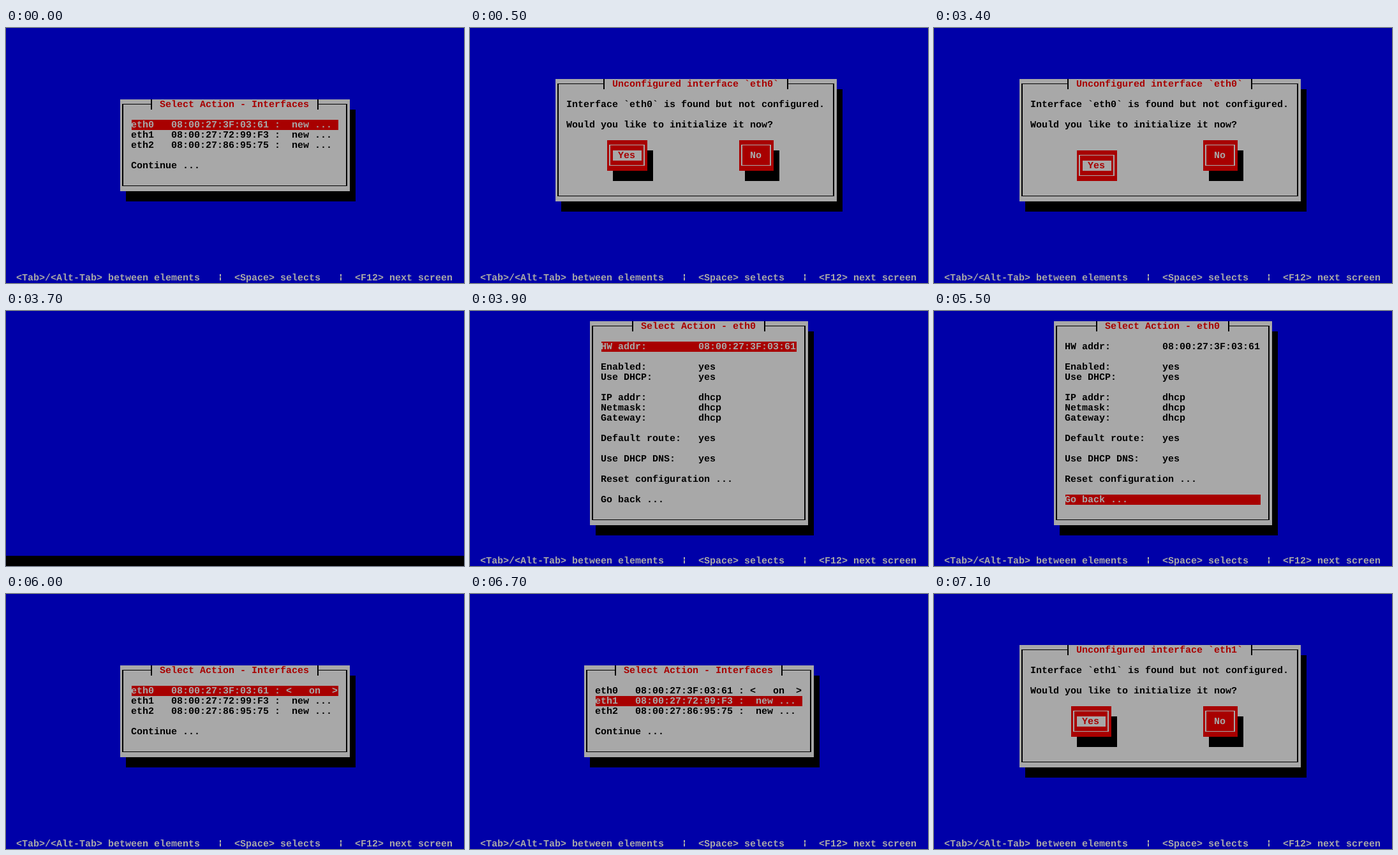
An HTML page for the animation above (8 s loop, 718 by 400 pixels).

```html
<!DOCTYPE html>
<html lang="en">
<head>
<meta charset="utf-8">
<title>Network setup</title>
<style>
html, body { margin: 0; width: 100%; height: 100%; overflow: hidden; background: #0000a8; }
svg { display: block; width: 100%; height: 100%; }
text {
  font: bold 15px "Liberation Mono", "DejaVu Sans Mono", monospace;
  white-space: pre;
  text-rendering: geometricPrecision;
  font-variant-ligatures: none;
}
rect { shape-rendering: crispEdges; }
</style>
</head>
<body>
<svg id="screen" viewBox="0 0 718 400"></svg>
<script>
const BLUE = '#0000a8', GRAY = '#a8a8a8', RED = '#a80000', BLACK = '#000';
const LOOP = 8000;
const screen = document.getElementById('screen');

// Text-mode grid: 80 columns of 9px, 25 rows of 16px.
const X = col => col * 9 - 1;
const Y = row => row * 16;

const rect = (x, y, w, h, fill) =>
  `<rect x="${x}" y="${y}" width="${w}" height="${h}" fill="${fill}"/>`;

const fillCells = (col, row, cols, rows, fill) =>
  rect(X(col), Y(row), cols * 9, rows * 16, fill);

const escapeText = s => s.replace(/&/g, '&amp;').replace(/</g, '&lt;').replace(/>/g, '&gt;');

const print = (col, row, s, fill = BLACK) =>
  `<text x="${X(col) - 1}" y="${Y(row) + 12}" fill="${fill}">${escapeText(s)}</text>`;

// Box-drawing border running through the middle of the outer cells.
function border(col, row, cols, rows, color) {
  const left = X(col) + 3, right = X(col + cols - 1) + 3;
  const top = Y(row) + 7, bottom = Y(row + rows - 1) + 7;
  const w = right - left + 2, h = bottom - top + 1;
  return rect(left, top, w, 1, color) + rect(left, bottom, w, 1, color) +
    rect(left, top, 2, h, color) + rect(right, top, 2, h, color);
}

function panel(col, row, cols, rows, title, titleCol) {
  const endCol = titleCol + title.length + 1;
  const gap = X(titleCol - 2) + 3;
  return fillCells(col + 1, row + 1, cols, rows, BLACK) +
    fillCells(col, row, cols, rows, GRAY) +
    border(col, row, cols, rows, BLACK) +
    rect(gap, Y(row), X(endCol) + 5 - gap, 16, GRAY) +
    rect(gap, Y(row), 2, 16, BLACK) +
    rect(X(endCol) + 3, Y(row), 2, 16, BLACK) +
    print(titleCol, row, title, RED);
}

function button(col, row, label, focused, pressed) {
  const cols = label.length + 4;
  const shadow = pressed ? '' : fillCells(col + 1, row + 1, cols, 3, BLACK);
  if (pressed) { col++; row++; }
  return shadow + fillCells(col, row, cols, 3, RED) +
    border(col, row, cols, 3, GRAY) +
    (focused ? fillCells(col + 1, row + 1, cols - 2, 1, GRAY) : '') +
    print(col + 2, row + 1, label, focused ? RED : GRAY);
}

function list(col, row, cols, items, selected) {
  return items.map((item, i) => {
    const on = i === selected;
    return (on ? fillCells(col, row + i, cols, 1, RED) : '') +
      (item ? print(col, row + i, item, on ? GRAY : BLACK) : '');
  }).join('');
}

function footer() {
  const bar = col => rect(X(col) + 3, Y(24) + 2, 2, 4, GRAY) + rect(X(col) + 3, Y(24) + 7, 2, 5, GRAY);
  return print(2, 24, '<Tab>/<Alt-Tab> between elements', GRAY) + bar(37) +
    print(40, 24, '<Space> selects', GRAY) + bar(58) +
    print(61, 24, '<F12> next screen', GRAY);
}

function interfaces(state, selected) {
  const items = [
    'eth0   08:00:27:3F:03:61 : ' + state,
    'eth1   08:00:27:72:99:F3 :  new ...',
    'eth2   08:00:27:86:95:75 :  new ...',
    '',
    'Continue ...'
  ];
  return panel(20, 7, 40, 9, 'Select Action - Interfaces', 27) +
    list(22, 9, 36, items, selected) + footer();
}

function question(name, pressed) {
  return panel(15, 5, 49, 12, `Unconfigured interface \`${name}\``, 25) +
    print(17, 7, `Interface \`${name}\` is found but not configured.`) +
    print(17, 9, 'Would you like to initialize it now?') +
    button(24, 11, 'Yes', true, pressed) +
    button(47, 11, 'No', false, false) + footer();
}

function settings(selected) {
  const pair = (label, value) => label.padEnd(17) + value;
  const items = [
    pair('HW addr:', '08:00:27:3F:03:61'), '',
    pair('Enabled:', 'yes'), pair('Use DHCP:', 'yes'), '',
    pair('IP addr:', 'dhcp'), pair('Netmask:', 'dhcp'), pair('Gateway:', 'dhcp'), '',
    pair('Default route:', 'yes'), '',
    pair('Use DHCP DNS:', 'yes'), '',
    'Reset configuration ...', '',
    'Go back ...'
  ];
  return panel(21, 1, 38, 20, 'Select Action - eth0', 30) +
    list(23, 3, 34, items, selected) + footer();
}

// Between dialogs the terminal is reset, which clears its last line.
const resetScreen = () => rect(0, Y(24), 718, 16, BLACK);

const scenes = [
  [0, () => interfaces(' new ...', 0)],
  [500, () => question('eth0', false)],
  [3400, () => question('eth0', true)],
  [3500, () => question('eth0', false)],
  [3700, resetScreen],
  [3900, () => settings(0)],
  [5000, () => settings(1)],
  [5500, () => settings(15)],
  [6000, () => interfaces('<   on  >', 0)],
  [6700, () => interfaces('<   on  >', 1)],
  [7100, () => question('eth1', false)]
];

let shown = null;

function draw(time) {
  const t = time % LOOP;
  const scene = scenes.filter(([start]) => start <= t).pop();
  if (scene === shown) return;
  shown = scene;
  screen.innerHTML = rect(0, 0, 718, 400, BLUE) + scene[1]();
}

const began = performance.now();
function tick() {
  draw(performance.now() - began);
  requestAnimationFrame(tick);
}
tick();
</script>
</body>
</html>
```
